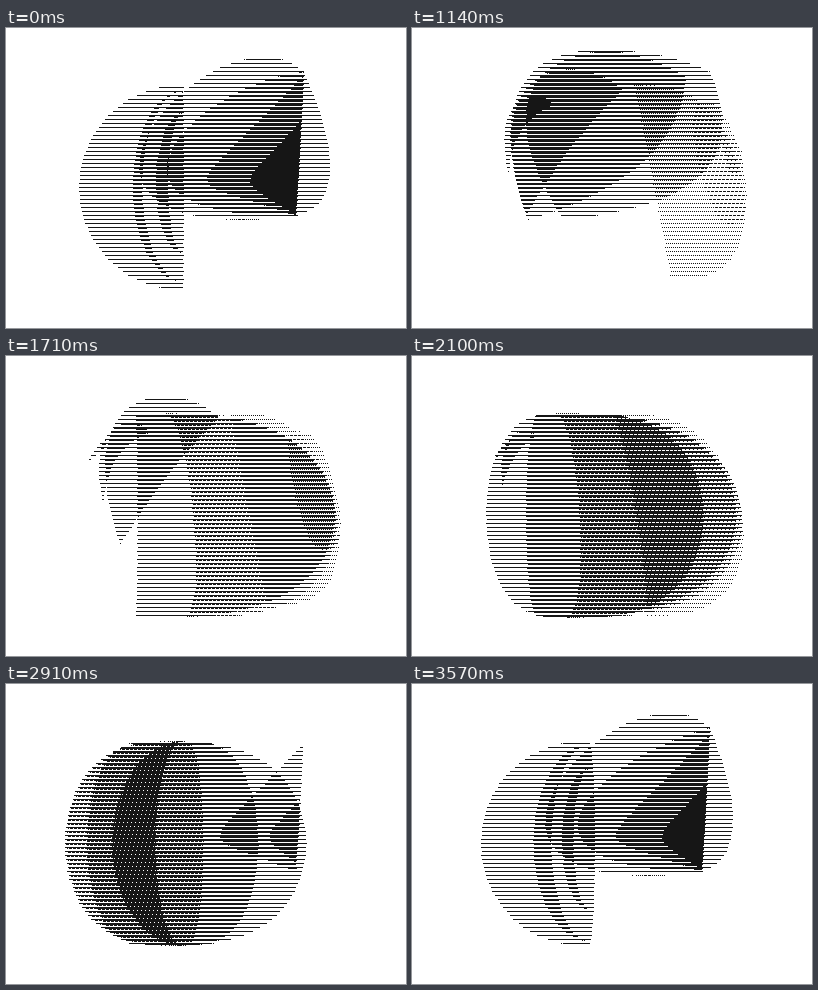
Animation, 400 px wide and 300 px high, one loop 3.6 s. Source, as an HTML page with a canvas:

```html
<!DOCTYPE html>
<html lang="en">
<head>
<meta charset="utf-8">
<title>Sweeping shells</title>
<style>
  html, body { margin: 0; width: 100%; height: 100%; overflow: hidden; background: #fff; }
  canvas { display: block; }
</style>
</head>
<body>
<canvas id="stage" width="400" height="300"></canvas>
<script>
const W = 400, H = 300, LOOP = 3600, LAG = 290, LAYERS = 4, INK = 22;
const ctx = document.getElementById('stage').getContext('2d', { willReadFrequently: true });

const mix = (a, b, k) => a + (b - a) * k;
const ease = (t, from, to) => {
  const k = Math.min(1, Math.max(0, (t - from) / (to - from)));
  return k * k * (3 - 2 * k);
};
// Eased moves [from, to, value], one after another; times in ms
const glide = (t, value, ...moves) =>
  moves.reduce((v, [from, to, goal]) => mix(v, goal, ease(t, from, to)), value);
const glidePoint = (t, point, ...moves) =>
  point.map((v, axis) => glide(t, v, ...moves.map(([from, to, goal]) => [from, to, goal[axis]])));

function fillLayer(density) {
  ctx.fillStyle = `rgba(255,255,255,${density})`;
  ctx.fill();
}

// Shell that opens from its right edge and folds away into its left edge
function drawUpper(t) {
  const top = glidePoint(t, [292, 145], [-1250, -500, [298, 44]], [300, 1500, [98, 86]]);
  const bottom = glidePoint(t, [289, 160], [-1200, -850, [290, 188]],
    [0, 380, [116, 192]], [750, 1500, [80, 104]]);
  const lead = glidePoint(t, [290, 150], [-1250, -480, [165, 184]],
    [-600, -50, [212, -34]], [0, 330, [210, 4]], [500, 1500, [97, 82]]);
  const follow = glidePoint(t, [290, 150], [-1250, -480, [165, 142]],
    [-600, -50, [-20, 225]], [0, 330, [44, -8]], [500, 1500, [92, 90]]);
  const back = glidePoint(t, [294, 140], [-290, 100, [366, 178]], [150, 1150, [100, 94]]);
  ctx.beginPath();
  ctx.moveTo(...top);
  ctx.bezierCurveTo(...lead, ...follow, ...bottom);
  ctx.quadraticCurveTo(...back, ...top);
  fillLayer(.25);
}

// Lune between a front and a back meridian that share two poles
function drawLower(t) {
  const topX = glide(t, 310, [650, 1650, 129], [1750, 2400, 177]);
  const bottomX = glide(t, 320, [800, 1700, 129], [1750, 2400, 177]);
  const topY = glide(t, 110, [450, 1100, 57], [2900, 3300, 85]);
  const bottomY = glide(t, 140, [450, 1300, 262], [2900, 3300, 225]);
  const front = glide(t, 315, [450, 2400, 58], [2550, 3250, 150]);
  const back = glide(t, 330, [1650, 3300, 120], [3000, 3300, 162]);
  const power = glide(t, .65, [2600, 2750, 1]);
  const density = glide(t, .1, [1200, 1700, .25], [2200, 2450, .2],
    [2550, 2730, .25], [3300, 3450, 0]);
  const axis = (topX + bottomX) / 2, steps = 40;
  ctx.beginPath();
  for (let i = 0; i <= 2 * steps; i++) {
    const s = Math.PI * i / steps;
    const k = (1 - Math.cos(s)) / 2;
    const bulge = (i <= steps ? front : back) - axis;
    ctx.lineTo(mix(topX, bottomX, k) + bulge * Math.abs(Math.sin(s)) ** power,
      mix(topY, bottomY, k));
  }
  fillLayer(density);
}

function drawEchoes(draw, birth, death, time) {
  for (let i = 0; i < LAYERS; i++) {
    const age = (time - i * LAG - birth + 2 * LOOP) % LOOP;
    if (birth + age < death) draw(birth + age);
  }
}

// Row-first ordered screen: dots join into a line before the next row starts
const ROW = [1, 2, 3, 0], COL = [0, 2, 1, 3];
function screen() {
  const image = ctx.getImageData(0, 0, W, H), px = image.data;
  for (let y = 0, p = 0; y < H; y++) {
    for (let x = 0; x < W; x++, p += 4) {
      const col = COL[(x + ((y + 1) >> 2)) & 3];
      const limit = (ROW[y & 3] * 4 + col + .5) / 16 * 255;
      px[p] = px[p + 1] = px[p + 2] = px[p] > limit ? INK : 255;
    }
  }
  ctx.putImageData(image, 0, 0);
}

function frame() {
  const time = performance.now() % LOOP;
  ctx.globalCompositeOperation = 'source-over';
  ctx.fillStyle = '#000';
  ctx.fillRect(0, 0, W, H);
  ctx.globalCompositeOperation = 'lighter';
  drawEchoes(drawUpper, -1200, 1550, time);
  drawEchoes(drawLower, 450, 3450, time);
  screen();
  requestAnimationFrame(frame);
}
frame();
</script>
</body>
</html>
```
